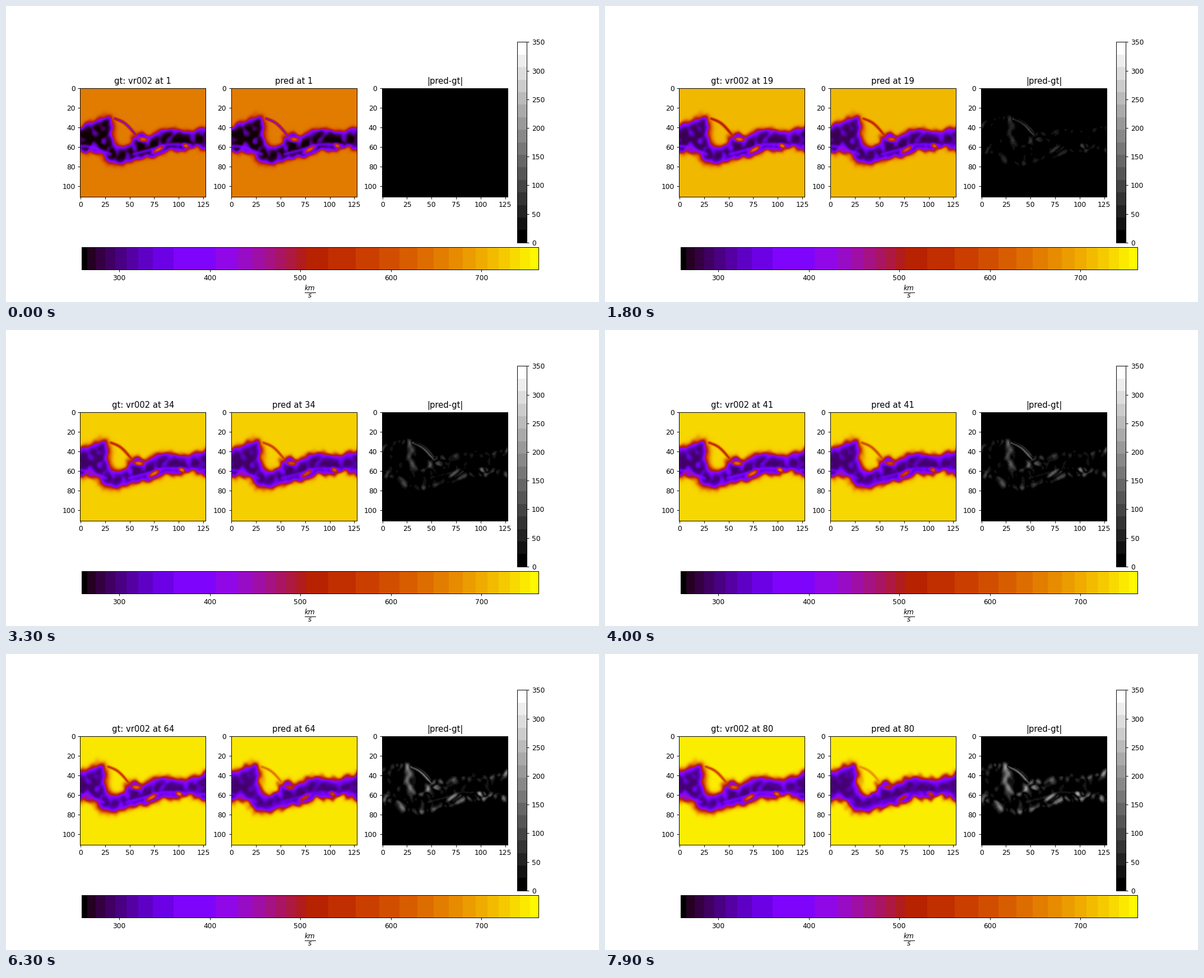
Write a matplotlib script that moves like this. It is 1058x529 px and loops after 8 s.

```python
import numpy as np
import matplotlib.pyplot as plt
from matplotlib.animation import FuncAnimation
from matplotlib.cm import ScalarMappable
from matplotlib.colors import ListedColormap, Normalize
from matplotlib.path import Path

W, H, DPI = 1058, 529, 88.16667
NX, NY, FRAMES = 128, 111, 80
VMIN, VMAX, ERR_MAX = 258.5, 763, 350
X, Y = np.meshgrid(np.arange(NX, dtype=float), np.arange(NY, dtype=float))
rng = np.random.default_rng(4)


# ---- colour maps: smooth for the panels, stepped for the bars -----------
def stepped_gnuplot(step=34.5):
    """Start a new band each time the colour has moved by one step."""
    x = (np.arange(1024) + 0.5) / 1024
    rgb = plt.get_cmap("gnuplot", 1024)(x)[:, :3]
    moves = np.diff(rgb * 255, axis=0) * [1, 2.2, 1]
    path = np.concatenate([[0], np.cumsum(np.hypot.reduce(moves, axis=1))])
    band = (path / step).astype(int)
    for b in range(band[-1] + 1):
        rgb[band == b] = rgb[band == b].mean(axis=0)
    rgb[band == 0] = 0
    return ListedColormap(rgb)


GRAY_CMAP = ListedColormap([(i / 15,) * 3 for i in range(16)])

# ---- geometry of the slow stream, in grid cells -------------------------
TOP = [(0, 40), (7, 35.5), (16, 33.5), (23, 29), (31, 29), (33.5, 37),
       (32.5, 46), (34, 56), (40, 61), (52, 57), (54, 48), (60, 45),
       (72, 50), (83, 41), (101, 42), (111, 45.5), (121, 41)]
BOTTOM = [(0, 64), (6, 66.5), (12, 64), (23, 67), (27, 75), (38, 78),
          (53, 74), (63, 71), (80, 69), (91, 62), (105, 64), (118, 59)]
ARC = [(35, 31), (43, 34), (49, 39), (56, 47.5)]
SEAMS = [[(-2, 59), (9, 59), (30, 67)], [(54, 67), (74, 62), (88, 56.5), (112, 58)]]
ISLANDS = [(63.5, 52, 5.4, 2.6, 8), (79, 62.5, 6.5, 2.3, -28), (107, 58.7, 3.4, 2.2, 20)]


def smooth(pts, rounds=2):
    p = np.array(pts, float)
    for _ in range(rounds):
        a, b = p[:-1], p[1:]
        mid = np.stack([0.75 * a + 0.25 * b, 0.25 * a + 0.75 * b], 1).reshape(-1, 2)
        p = np.vstack([p[:1], mid, p[-1:]])
    return p


def periodic(pts):
    p = np.array(pts, float)
    return smooth(np.vstack([p[-4:] - [NX, 0], p, p[:4] + [NX, 0]]))


def distance(pts):
    best = np.full(X.shape, 1e9)
    for (x0, y0), (x1, y1) in zip(pts[:-1], pts[1:]):
        dx, dy = x1 - x0, y1 - y0
        t = np.clip(((X - x0) * dx + (Y - y0) * dy) / (dx * dx + dy * dy), 0, 1)
        best = np.minimum(best, (X - x0 - t * dx) ** 2 + (Y - y0 - t * dy) ** 2)
    return np.sqrt(best)


def line(pts, width):
    return np.exp(-(distance(smooth(pts)) / width) ** 2)


def ellipse(x, y, rx, ry, tilt):
    c, s = np.cos(np.radians(tilt)), np.sin(np.radians(tilt))
    u, v = X - x, Y - y
    return np.exp(-(((u * c + v * s) / rx) ** 2 + ((v * c - u * s) / ry) ** 2) ** 1.5)


def noise(waves=40):
    """Random ripples that wrap around in x."""
    total = np.zeros(X.shape)
    for _ in range(waves):
        kx, ky = rng.integers(3, 15), rng.uniform(-0.55, 0.55)
        total += np.cos(2 * np.pi * kx * X / NX + ky * Y + rng.uniform(0, 2 * np.pi))
    return total / np.sqrt(waves / 2)


top, bottom = periodic(TOP), periodic(BOTTOM)
inside = Path(np.vstack([top, bottom[::-1]])).contains_points(
    np.column_stack([X.ravel(), Y.ravel()])).reshape(X.shape)
texture, wobble = noise(), noise()
depth = np.where(inside, -1, 1) * np.minimum(distance(top), distance(bottom))
depth += 0.5 * texture
lobe = np.exp(-((X - 28) / 18) ** 2)
arc = line(ARC, 1.25)
seam = np.maximum(*[line(s, 1.5) for s in SEAMS])
island = np.max([ellipse(*e) for e in ISLANDS], axis=0)


# ---- evolution ----------------------------------------------------------
def stream(k, lag, fade, warp):
    """Scaled speed after k steps; the pattern drifts left and softens."""
    p = (k / (FRAMES - 1)) ** 0.75
    d = depth + warp * p * wobble
    width = np.where(d < 0, 3 + 0.9 * p, 2 + 0.8 * lobe + 0.5 * p)
    slow = 0.5 - 0.5 * np.tanh(d / width)
    slow *= 1 - 0.07 * (1 - fade * p) * np.clip(texture, 0, None)
    slow *= 1 - 0.2 * (1 - fade * p) * seam
    slow *= 1 - 0.9 * (1 - 0.6 * fade * p) * island
    slow = np.maximum(slow, arc * (0.62 - 0.55 * fade * p))

    shift = 8.3 * lag * p
    i, f = int(shift), shift % 1
    slow = (1 - f) * np.roll(slow, -i, axis=1) + f * np.roll(slow, -i - 1, axis=1)
    wind = 1 - 0.214 * np.exp(-0.083 * k ** 0.75)
    core = 0.004 + 0.07 * (1 - np.exp(-k / 14))
    return wind - (wind - core) * slow


# ---- figure -------------------------------------------------------------
fig = plt.figure(figsize=(12, 6), dpi=DPI, facecolor="white")


def axes_px(x, y, w, h):
    return fig.add_axes([x / W, 1 - (y + h) / H, w / W, h / H])


def panel(col, cmap, vmax):
    ax = axes_px(132.25 + 269.3 * col, 146.6, 224.1, 194.2)
    im = ax.imshow(np.zeros((NY, NX)), cmap=cmap, vmin=0, vmax=vmax, aspect="auto")
    ax.set_xticks(range(0, 126, 25))
    ax.set_yticks(range(0, 101, 20))
    return ax, im


ax_gt, im_gt = panel(0, "gnuplot", 1)
ax_pred, im_pred = panel(1, "gnuplot", 1)
ax_err, im_err = panel(2, GRAY_CMAP, ERR_MAX)
ax_err.set_title("|pred-gt|")

fig.colorbar(ScalarMappable(Normalize(0, ERR_MAX), GRAY_CMAP),
             cax=axes_px(912, 64.4, 17.4, 358.4))
speed_bar = fig.colorbar(ScalarMappable(Normalize(VMIN, VMAX), stepped_gnuplot()),
                         cax=axes_px(135, 430.8, 815, 40.4),
                         orientation="horizontal")
speed_bar.set_label(r"$\frac{km}{s}$", fontsize=14)


def update(k):
    gt = stream(k, 1.0, 0.35, 0)
    pred = stream(k, 0.7, 0.8, 0.6)
    im_gt.set_data(gt)
    im_pred.set_data(pred)
    im_err.set_data(np.abs(pred - gt) * (VMAX - VMIN))
    ax_gt.set_title(f"gt: vr002 at {k + 1}")
    ax_pred.set_title(f"pred at {k + 1}")
    return im_gt, im_pred, im_err


anim = FuncAnimation(fig, update, frames=FRAMES, interval=100, repeat=True,
                     repeat_delay=0, blit=False)
plt.show()
```
